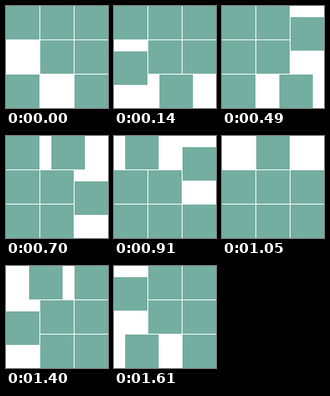
Recreate the animation shown at these times as an HTML page. Size 128 by 128 pixels, loop 1680 ms.

```html
<!DOCTYPE html>
<html lang="en">
<head>
<meta charset="utf-8">
<title>Sliding tiles</title>
<style>
html, body { margin: 0; width: 100%; height: 100%; overflow: hidden; background: #fff; }
svg { display: block; width: 100vw; height: 100vh; }
</style>
</head>
<body>
<svg id="stage" viewBox="0 0 128 128" fill="#74aea0" shape-rendering="crispEdges"></svg>
<script>
const SIZE = 42, PITCH = 43, STEP = 70, STEPS_PER_MOVE = 3;

// Cells are numbered 0-8 by row; each phase slides two tiles, [from, to].
const PHASES = [
  [[6, 3], [8, 7]],
  [[5, 8], [7, 6]],
  [[2, 5], [8, 7]],
  [[1, 2], [5, 8]],
  [[0, 1], [2, 5]],
  [[3, 0], [1, 2]],
  [[0, 1], [6, 3]],
  [[3, 0], [7, 6]]
];
const LOOP = PHASES.length * STEPS_PER_MOVE * STEP;

const stage = document.getElementById("stage");
const tiles = Array.from({ length: 7 }, () => {
  const rect = document.createElementNS("http://www.w3.org/2000/svg", "rect");
  rect.setAttribute("width", SIZE);
  rect.setAttribute("height", SIZE);
  return stage.appendChild(rect);
});

const col = cell => cell % 3;
const row = cell => Math.floor(cell / 3);
const slide = (a, b, k) => Math.round(PITCH * (a + (b - a) * k));

function render(ms) {
  const step = Math.floor((ms % LOOP) / STEP);
  const moves = PHASES[Math.floor(step / STEPS_PER_MOVE)];
  const k = (step % STEPS_PER_MOVE) / STEPS_PER_MOVE;
  const busy = moves.flat();
  const still = [...Array(9).keys()].filter(c => !busy.includes(c)).map(c => [c, c]);
  [...still, ...moves].forEach(([from, to], i) => {
    tiles[i].setAttribute("x", slide(col(from), col(to), k));
    tiles[i].setAttribute("y", slide(row(from), row(to), k));
  });
}

const start = performance.now();
function tick() {
  render(performance.now() - start);
  requestAnimationFrame(tick);
}
tick();
</script>
</body>
</html>
```
